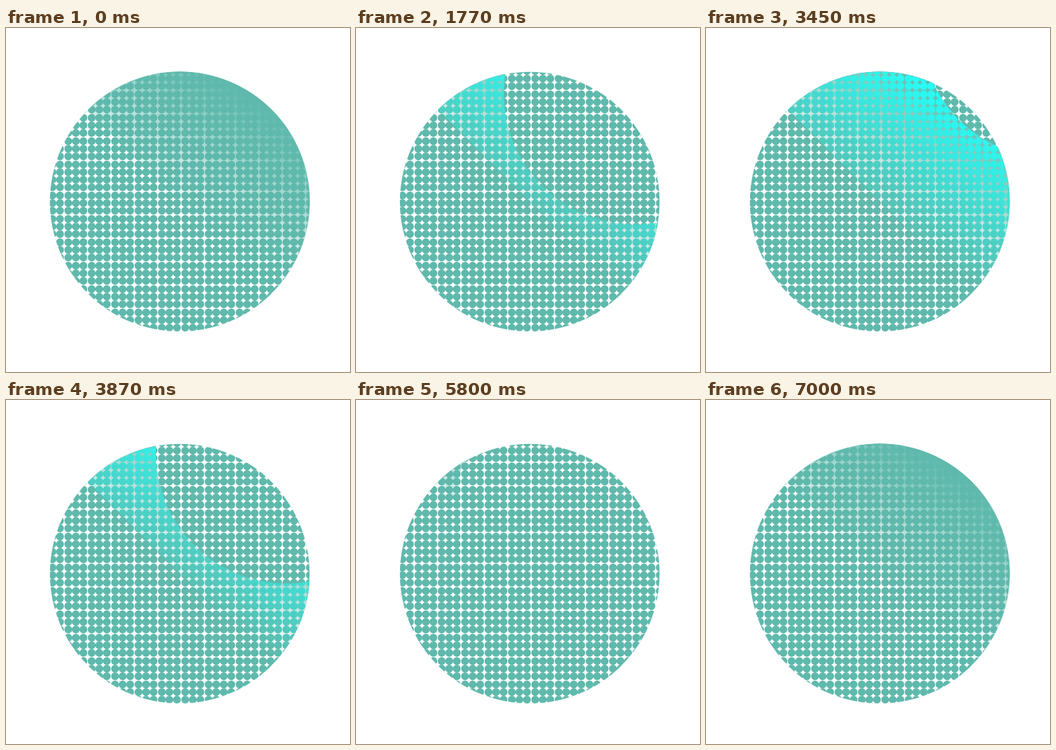
Write an HTML page that moves like this. It is 500 by 500 pixels and loops after 7560 ms.

```html
<!DOCTYPE html>
<html lang="en">
<head>
<meta charset="utf-8">
<title>Dotted disc</title>
<style>
  html, body { margin: 0; width: 100%; height: 100%; overflow: hidden; background: #fff; }
  svg { display: block; width: 100vw; height: 100vh; }
</style>
</head>
<body>
<svg viewBox="0 0 500 500">
  <defs>
    <clipPath id="disc"><circle cx="252.5" cy="252.5" r="188.7"/></clipPath>
    <clipPath id="half"><path d="M118.5 118.5A189.5 189.5 0 0 1 386.5 386.5Z"/></clipPath>
    <mask id="cut" maskUnits="userSpaceOnUse" x="0" y="0" width="500" height="500">
      <rect width="500" height="500" fill="#fff"/>
      <circle id="hole" r="190" fill="#000"/>
    </mask>
    <linearGradient id="teal" gradientUnits="userSpaceOnUse">
      <stop stop-color="#5fb9ac" stop-opacity="0"/>
      <stop offset="1" stop-color="#5fb9ac"/>
    </linearGradient>
    <linearGradient id="cyan" gradientUnits="userSpaceOnUse">
      <stop stop-color="#26fff8" stop-opacity="0"/>
      <stop offset="1" stop-color="#26fff8"/>
    </linearGradient>
  </defs>
  <rect width="500" height="500" fill="#fff"/>
  <g clip-path="url(#disc)"><path class="dots" fill="#5fb9ac"/></g>
  <g mask="url(#cut)">
    <g clip-path="url(#half)">
      <circle cx="252.5" cy="252.5" r="189.5" fill="url(#teal)"/>
      <g id="glow" clip-path="url(#disc)"><path class="dots" fill="url(#cyan)"/></g>
    </g>
  </g>
</svg>
<script>
const LOOP = 7560, MID = 252.5, FAR = 269;
const $ = id => document.getElementById(id);

// Dot centres along one axis: groups of three, with one group of four.
function centres(start, wide) {
  const list = [];
  for (let line = start; line < 445;) {
    const n = line === wide ? 4 : 3;
    for (let i = 0; i < n; i++) list.push(line + 6 + 11 * i);
    line += 11 * n + 1;
  }
  return list;
}

function dotPath(r) {
  let d = '';
  for (const y of centres(56.5, 192.5)) {
    for (const x of centres(50.5, 288.5)) {
      if (Math.hypot(x - MID, y - MID) < 197)
        d += `M${x - r} ${y}a${r} ${r} 0 1 0 ${2 * r} 0a${r} ${r} 0 1 0 ${-2 * r} 0`;
    }
  }
  return d;
}
const path = dotPath(5.65);
document.querySelectorAll('.dots').forEach(e => e.setAttribute('d', path));

// Opacity is base + gx * right + gy * up, measured from the disc centre.
const base = 0.12, gx = 0.00265, gy = 0.00395, g2 = gx * gx + gy * gy;
for (const id of ['teal', 'cyan']) {
  [0, 1].forEach(v => {
    const k = (v - base) / g2;
    $(id).setAttribute('x' + (v + 1), MID + gx * k);
    $(id).setAttribute('y' + (v + 1), MID - gy * k);
  });
}

// Time, then the offset of the cut-out circle to the right and up.
const keys = [
  [0, FAR, FAR], [35, FAR, FAR], [810, 15, 28], [1020, 0, 0],
  [1300, 0, 0], [1770, 152, 157], [2070, 200, 197], [2490, 252, 231], [2790, FAR, FAR],
  [3370, FAR, FAR], [3870, 155.5, 176], [4140, 126, 154], [4800, 0, 0],
  [5390, 0, 0], [5800, 78, 85], [6160, 159, 163], [6940, 266, 250], [7000, FAR, FAR],
  [LOOP, FAR, FAR]
];

const rate = (i, c) => (keys[i + 1][c] - keys[i][c]) / (keys[i + 1][0] - keys[i][0]);

// Tangent that never overshoots; ends of a move keep the speed of the move.
function slope(i, c, seg) {
  const other = i === seg ? i - 1 : i;
  if (other < 0 || other > keys.length - 2) return rate(seg, c);
  const a = rate(seg, c), b = rate(other, c);
  if (b === 0) return a;
  return a * b > 0 ? 2 * a * b / (a + b) : 0;
}

function at(t, c) {
  let i = 0;
  while (i < keys.length - 2 && t >= keys[i + 1][0]) i++;
  const h = keys[i + 1][0] - keys[i][0], u = (t - keys[i][0]) / h;
  const p = keys[i][c], q = keys[i + 1][c];
  if (p === q) return p;
  const m = slope(i, c, i) * h, n = slope(i + 1, c, i) * h, w = 1 - u;
  return p * (1 + 2 * u) * w * w + m * u * w * w + q * u * u * (3 - 2 * u) - n * u * u * w;
}

function draw(t) {
  $('hole').setAttribute('cx', MID + at(t, 1));
  $('hole').setAttribute('cy', MID - at(t, 2));
  $('glow').setAttribute('visibility', t > 1150 && t < 5100 ? 'visible' : 'hidden');
}

const begin = performance.now();
function tick() {
  draw((performance.now() - begin) % LOOP);
  requestAnimationFrame(tick);
}
draw(0);
requestAnimationFrame(tick);
</script>
</body>
</html>
```
